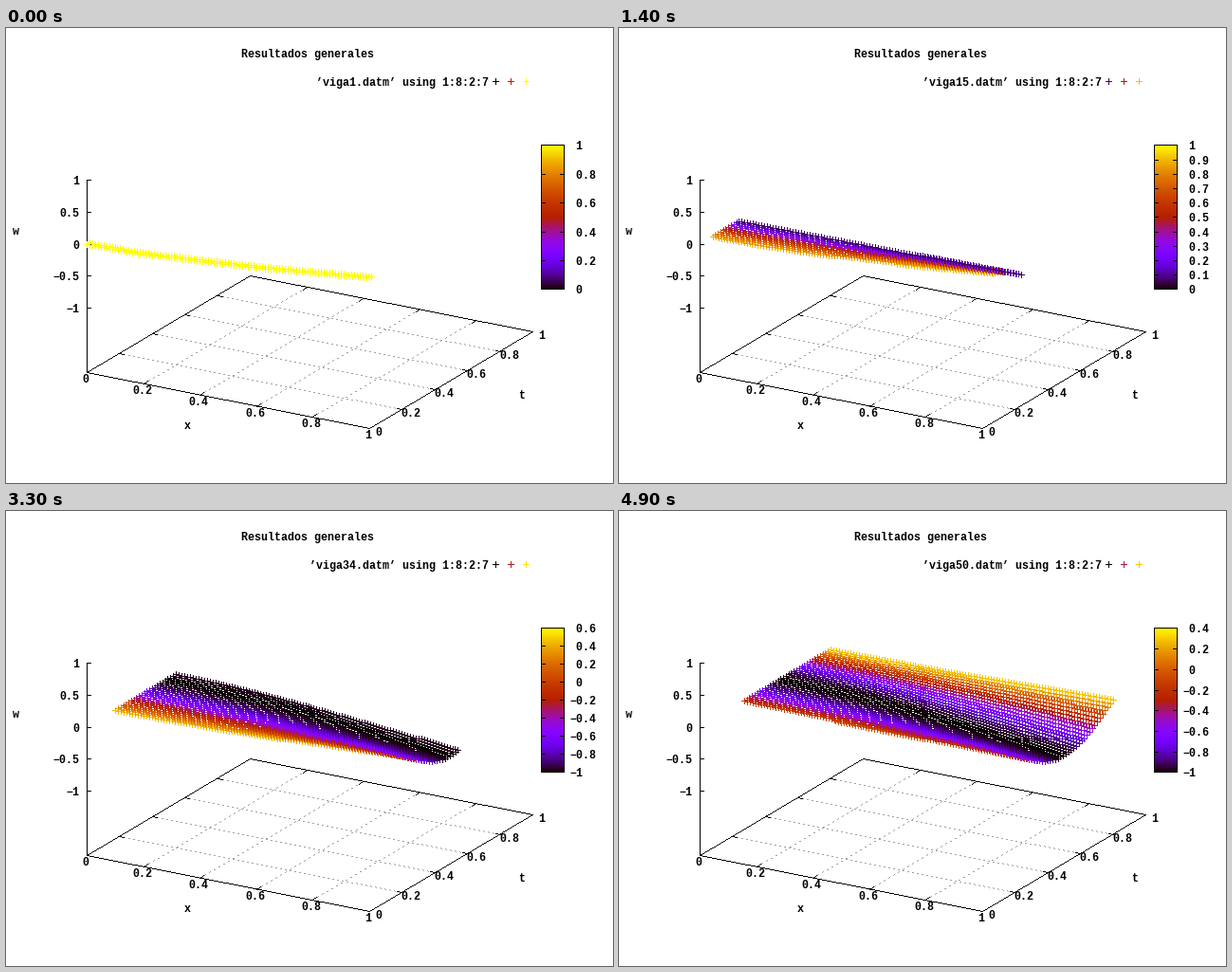
A matplotlib script that plays this animation: 640x480 px, repeating every 5 s.

```python
import math
import matplotlib.pyplot as plt
import numpy as np
from matplotlib.animation import FuncAnimation

W, H, DPI = 640, 480, 100
FRAMES, INTERVAL = 50, 100
DT, DPHASE = 0.016, 0.1            # time and phase between two rows
BLACK, GRAY = (0, 0, 0, 1), (0.63, 0.63, 0.63, 1)
BAR_LEFT, BAR_RIGHT, BAR_TOP, BAR_BOTTOM = 564, 588, 123, 275
COLUMNS = 101

fig = plt.figure(figsize=(W / DPI, H / DPI), dpi=DPI, facecolor="white")
ax = fig.add_axes([0, 0, 1, 1])
ax.axis("off")
base = np.zeros((H, W, 4))


def project(x, t, w=-2.0):
    """Pixel of a point, seen at 60 and 30 degrees, cut towards the middle."""
    x, t = x - 0.5, t - 0.5
    c, s = math.cos(math.pi / 6), 0.5
    across = 345 * (x * c + t * s)
    up = 236 * ((t * c - x * s) / 2 + (w + 0.5) * c / 3)
    return 320 + np.trunc(across), 240 - np.trunc(up)


def palette(gray):
    g = np.clip(np.asarray(gray, float), 0, 1)
    blue = np.clip(np.sin(2 * np.pi * g), 0, 1)
    return np.stack([np.sqrt(g), g ** 3, blue, np.ones_like(g)], axis=-1)


def label(x, y, text, ha="left"):
    return ax.text(x - 0.5, y + 3.5, text.replace("-", "\u2212"), ha=ha,
                   va="baseline", color="black", family="Liberation Mono",
                   weight="bold", size=11.67 * 72 / DPI)


def line(p, q, color=BLACK, dashed=False):
    p, q = np.rint(p), np.rint(q)
    count = int(max(abs(q - p)))
    k = np.arange(count + 1)
    x, y = np.rint(p[:, None] + np.outer(q - p, k / count)).astype(int)
    shown = k % 5 < 2 if dashed else k >= 0
    base[y[shown], x[shown]] = color


def ticks_along(p, q, length=5):
    """Short marks at both ends of the segment p-q, pointing inwards."""
    p, q = np.array(p), np.array(q)
    step = (q - p) / np.hypot(*(q - p)) * length
    line(p, p + step)
    line(q, q - step)


def draw_axes():
    for v in (0.2, 0.4, 0.6, 0.8):
        for p, q in ((project(v, 0), project(v, 1)),
                     (project(0, v), project(1, v))):
            line(p, q, GRAY, dashed=True)
            ticks_along(p, q)
    corners = [project(*c) for c in ((0, 0), (1, 0), (1, 1), (0, 1))]
    for p, q in zip(corners, corners[1:] + corners[:1]):
        line(p, q)
    for k in range(6):
        v = k / 5
        x, y = project(v, 0)
        label(x - 1.5, y + 7, f"{v:g}", "center")
        x, y = project(1, v)
        label(x + 9.5, y + 4, f"{v:g}", "center")
    line(project(0, 0), project(0, 0, 1))
    for w in (-1, -0.5, 0, 0.5, 1):
        x, y = project(0, 0, w)
        line((x, y), (x + 4, y))
        label(77, y + 1, f"{w:g}", "right")
    label(318, 27, "Resultados generales", "center")
    label(10, 214, "w", "center")
    label(191, 419, "x", "center")
    label(544, 387, "t", "center")


def draw_color_bar():
    rows = np.arange(BAR_TOP, BAR_BOTTOM + 1)
    shades = palette((BAR_BOTTOM - rows) / (BAR_BOTTOM - BAR_TOP))
    base[BAR_TOP:BAR_BOTTOM + 1, BAR_LEFT:BAR_RIGHT + 1] = shades[:, None]
    for y in (BAR_TOP, BAR_BOTTOM):
        line((BAR_LEFT, y), (BAR_RIGHT, y))
    for x in (BAR_LEFT, BAR_RIGHT):
        line((x, BAR_TOP), (x, BAR_BOTTOM))


ARM = np.arange(-3, 4)
PLUS_X = np.concatenate([ARM, 0 * ARM])
PLUS_Y = np.concatenate([0 * ARM, ARM])


def pluses(canvas, x, y, colors):
    cols = np.asarray(x, int)[:, None] + PLUS_X
    rows = np.asarray(y, int)[:, None] + PLUS_Y
    canvas[rows, cols] = colors[:, None]


def tick_step(span):
    power = 10.0 ** math.floor(math.log10(span))
    norm = span / power
    return power * (0.2 if norm <= 2 else 0.5 if norm <= 5 else 1)


draw_axes()
draw_color_bar()
picture = ax.imshow(base, interpolation="nearest", aspect="auto")
ax.set_xlim(-0.5, W - 0.5)
ax.set_ylim(H - 0.5, -0.5)
key = label(509, 57, "", "right")
bar_labels = []


def update(frame):
    n = frame + 1
    # Points run row by row; the oldest third has dropped out.
    start = max(0, round(frame * COLUMNS / 3) - 1)
    row, column = np.divmod(np.arange(start, (n + 1) * COLUMNS), COLUMNS)
    x = column / (COLUMNS - 1)
    value = np.cos(DPHASE * row)
    w = value * x ** 2 * (3 - x) / 6     # cantilever under a tip load

    low, high = value.min(), value.max()
    if start < COLUMNS:                  # the scale still starts at zero
        low = 0.0
    step = tick_step(high - low)
    bottom = math.floor(low / step + 1e-9)
    top = math.ceil(high / step - 1e-9)

    def shade(v):
        return palette((v / step - bottom) / (top - bottom))

    canvas = base.copy()
    pluses(canvas, *project(x, row * DT, w), shade(value))
    pluses(canvas, (516, 532, 548), (56, 56, 56),
           shade(np.array([low, (low + high) / 2, high])))

    while bar_labels:
        bar_labels.pop().remove()
    for k in range(bottom, top + 1):
        part = (k - bottom) / (top - bottom)
        y = math.ceil(BAR_BOTTOM - (BAR_BOTTOM - BAR_TOP) * part - 1e-9)
        canvas[y, BAR_LEFT:BAR_LEFT + 5] = BLACK
        canvas[y, BAR_RIGHT - 4:BAR_RIGHT + 1] = BLACK
        text = f"{round(k * step, 6) + 0.0: g}"
        bar_labels.append(label(594, y + 1, text))
    picture.set_data(canvas)
    key.set_text(f"\u2019viga{n}.datm\u2019 using 1:8:2:7")
    return [picture, key, *bar_labels]


anim = FuncAnimation(fig, update, frames=FRAMES, interval=INTERVAL,
                     repeat=True, repeat_delay=0, blit=False)
plt.show()
```
